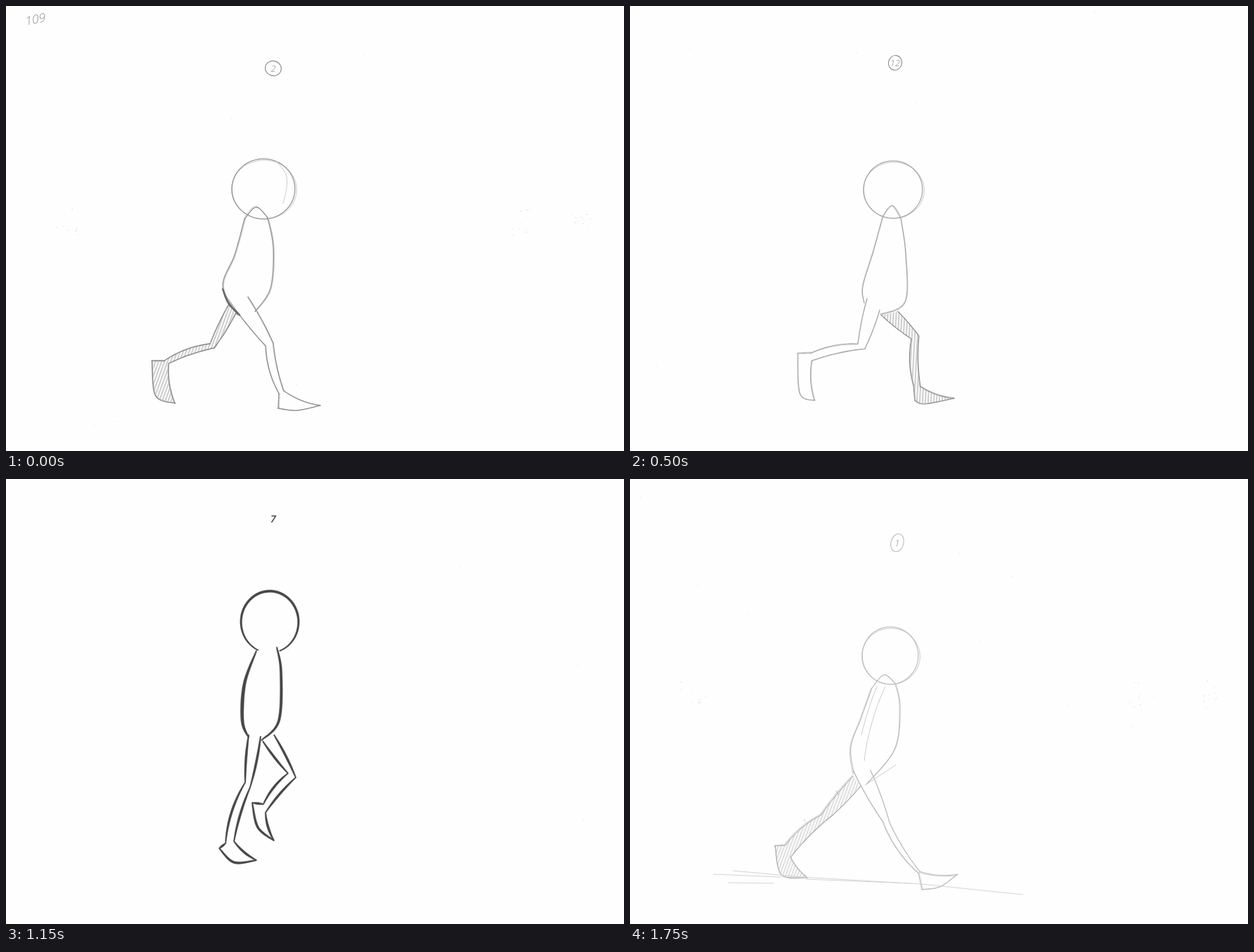
These frames come from a looping animation (881 px wide and 635 px high, 1800 ms). An HTML page:

```html
<!DOCTYPE html>
<html lang="en">
<head>
<meta charset="utf-8">
<title>Walk cycle, pencil and ink</title>
<style>
html, body { margin: 0; width: 100%; height: 100%; overflow: hidden; background: #fefefe; }
svg { display: block; width: 881px; height: 635px; }
text { font-family: "Open Sans", "DejaVu Sans", sans-serif; text-anchor: middle; }
</style>
</head>
<body>
<svg viewBox="0 0 881 635">
  <defs>
    <pattern id="hatch" width="4" height="40" patternUnits="userSpaceOnUse">
      <path id="hatchLine" d="M2 0V40" stroke-width="1.1"/>
    </pattern>
  </defs>
  <g id="sheet" fill="none" stroke-linecap="round" stroke-linejoin="round"></g>
</svg>
<script>
const STEP = 50, SHEETS = 36, CYCLE = 18;
const INK = '#474747', FIRST_INK = 17, LAST_INK = 34;
const sheet = document.getElementById('sheet');
const hatch = document.getElementById('hatch');
const hatchLine = document.getElementById('hatchLine');

// Key poses: label and head (centre, radii), torso (back, front), then one leg each:
// rear hip, knee, ankle, heel, sole, toe, front ankle, knee, hip.
const keys = {};
const points = s => s.split(' ').map(p => p.split(',').map(Number));
function pose(n, head, torso, near, far) {
  keys[n] = { head: points(head), torso: points(torso), near: points(near), far: points(far) };
}

pose(1, '381,91 371,252 40,41',
  '345,298 330,340 315,382 319,420 379,293 385,325 378,385 338,435',
  '318,416 361,490 411,562 416,586 442,582 467,564 413,560 370,490 343,416',
  '318,424 272,480 222,522 207,523 216,565 253,569 229,540 285,483 329,438');
pose(2, '381,89 367,261 45,43',
  '340,304 326,355 309,400 330,441 373,302 381,345 377,403 355,436',
  '311,410 370,485 389,553 388,574 415,577 448,570 396,549 381,481 345,415',
  '318,425 291,482 226,506 208,506 213,556 241,567 232,510 297,488 328,438');
pose(4, '375,75 371,233 40,42',
  '353,269 336,330 330,376 340,403 378,272 390,315 392,378 368,411',
  '341,404 375,457 369,517 360,544 385,552 416,547 376,519 389,459 359,391',
  '342,405 342,462 275,486 262,482 245,530 254,546 283,493 352,474 357,433');
pose(7, '381,57 376,204 41,44',
  '357,245 340,292 337,345 346,369 386,240 392,275 389,345 364,373',
  '346,365 341,433 313,520 304,527 325,547 357,544 325,517 348,440 363,367',
  '366,374 402,420 367,464 351,462 359,497 382,516 370,476 413,426 382,365');
pose(9, '377,57 374,212 41,44',
  '350,257 329,305 327,350 344,375 387,254 391,295 383,360 350,377',
  '341,363 319,428 286,497 270,494 286,547 319,545 292,498 330,432 360,366',
  '360,375 386,440 424,515 428,544 455,520 467,478 427,508 402,436 372,365');
pose(12, '378,81 375,262 42,41',
  '361,299 347,350 332,400 334,424 386,303 393,355 392,422 357,440',
  '338,418 325,482 258,495 239,496 242,553 263,563 259,506 335,489 356,434',
  '358,441 401,475 404,541 406,563 420,568 462,560 414,543 412,471 382,436');
pose(16, '381,55 375,200 40,44',
  '363,237 337,290 332,343 350,372 376,226 389,260 389,335 379,362',
  '362,374 397,414 370,460 349,459 357,495 382,515 370,472 413,421 373,354',
  '343,368 336,430 315,505 297,518 322,543 362,542 323,517 349,432 360,373');

// The other half of the stride swaps the legs.
for (const n of Object.keys(keys).map(Number)) {
  const half = (n + 8) % CYCLE + 1, k = keys[n];
  keys[half] ??= { ...k, near: k.far, far: k.near };
}
const order = Object.keys(keys).map(Number).sort((a, b) => a - b);

function poseAt(n) {
  const a = order.findLast(k => k <= n), b = order.find(k => k >= n);
  const u = a === b ? 0 : (n - a) / (b - a), out = {};
  for (const part in keys[a]) {
    out[part] = keys[a][part].map((p, i) => p.map((v, j) => v + (keys[b][part][i][j] - v) * u));
  }
  return out;
}

function randomFrom(seed) {
  return () => (seed = (seed * 16807) % 2147483647) / 2147483647;
}

// Curves are sampled to point lists.
function bow([ax, ay], [bx, by], k) {
  const mx = (ax + bx) / 2 - (by - ay) * k * 2, my = (ay + by) / 2 + (bx - ax) * k * 2;
  return Array.from({ length: 13 }, (_, i) => {
    const t = i / 12, s = 1 - t;
    return [s * s * ax + 2 * s * t * mx + t * t * bx, s * s * ay + 2 * s * t * my + t * t * by];
  });
}

function spline(p) {
  const out = [p[0]];
  for (let i = 0; i < p.length - 1; i++) {
    const a = p[i - 1] || p[i], b = p[i], c = p[i + 1], d = p[i + 2] || c;
    for (let s = 1; s <= 10; s++) {
      const t = s / 10;
      out.push([0, 1].map(j => b[j] + t / 2 * (c[j] - a[j]
        + t * (2 * a[j] - 5 * b[j] + 4 * c[j] - d[j] + t * (3 * (b[j] - c[j]) + d[j] - a[j])))));
    }
  }
  return out;
}

function arc([cx, cy], [rx, ry], from, to) {
  return Array.from({ length: 49 }, (_, i) => {
    const a = from + (to - from) * i / 48;
    return [cx + rx * Math.cos(a), cy + ry * Math.sin(a)];
  });
}

const path = p => 'M' + p.map(q => q[0].toFixed(1) + ' ' + q[1].toFixed(1)).join('L');

function brush(p, weight) {
  const left = [], right = [];
  p.forEach(([x, y], i) => {
    const a = p[Math.max(i - 1, 0)], b = p[Math.min(i + 1, p.length - 1)];
    const dx = b[0] - a[0], dy = b[1] - a[1], len = Math.hypot(dx, dy) || 1;
    const w = (1.5 + (weight - 1.5) * Math.sin(Math.PI * i / (p.length - 1))) / 2;
    left.push([x - dy / len * w, y + dx / len * w]);
    right.unshift([x + dy / len * w, y - dx / len * w]);
  });
  return `<path d="${path(left.concat(right))}Z" fill="${INK}" stroke="${INK}" stroke-width=".4"/>`;
}

const line = (p, color, width = 1) =>
  `<path d="${path(p)}" stroke="${color}" stroke-width="${width}"/>`;

function legStrokes([hipB, kneeB, ankleB, heel, sole, toe, ankleF, kneeF, hipF]) {
  return [
    bow(hipB, kneeB, .02), bow(kneeB, ankleB, .06), bow(ankleB, heel, 0),
    spline([heel, sole, toe]), bow(toe, ankleF, -.06),
    bow(ankleF, kneeF, -.03), bow(kneeF, hipF, .02)
  ];
}

function specks(n, ink, random) {
  let out = '';
  const dot = (x, y, color) => {
    out += `<circle cx="${x.toFixed(1)}" cy="${y.toFixed(1)}" r="${(.4 + random() * .4).toFixed(2)}" fill="${color}"/>`;
  };
  for (let i = 0; i < 14; i++) dot(random() * 830, 8 + random() * 620, '#e4e4e4');
  if (!ink && n < 3) {
    for (const x of [90, 730, 818]) {
      for (let i = 0; i < 10; i++) dot(x + (random() - .5) * 36, 308 + (random() - .5) * 40, '#d2d2d2');
    }
  }
  return out;
}

function drawInk(n, { head, torso, near, far }) {
  const [label, centre, radii] = head;
  const strokes = [...legStrokes(far), ...legStrokes(near)].map(s => brush(s, 3.2));
  return strokes.join('')
    + brush(arc(centre, radii, 1.22, 1.98 - 2 * Math.PI), 3.4)
    + brush(spline(torso.slice(0, 4)), 4.6)
    + brush(spline(torso.slice(4)), 3.6)
    + `<text x="${label[0]}" y="${label[1] + 5}" font-size="15" font-weight="600" font-style="italic" fill="${INK}">${n}</text>`;
}

function drawPencil(n, { head, torso, near, far }, random) {
  const [label, centre, radii] = head;
  const color = n === 1 ? '#bdbdbd' : n === 2 ? '#8c8c8c' : '#a2a2a2';
  const dark = n === 1 ? '#adadad' : '#858585';
  const soft = '#cccccc';
  const back = spline(torso.slice(0, 4)), front = spline(torso.slice(4));
  const shaky = p => {
    const dx = (random() - .5) * 3, dy = (random() - .5) * 3;
    return p.map(([x, y]) => [x + dx, y + dy]);
  };
  const sketch = (p, c = color) => line(shaky(p), soft) + line(p, c, n === 2 ? 1.3 : 1.1);

  hatch.setAttribute('patternTransform', `rotate(${n > 5 && n < 13 ? 3 : 20})`);
  hatchLine.setAttribute('stroke', n === 1 ? '#c4c4c4' : '#a4a4a4');

  const farStrokes = legStrokes(far);
  let out = `<path d="${path(farStrokes.flat())}Z" fill="url(#hatch)"/>`;
  out += farStrokes.map(s => sketch(s, dark)).join('');
  out += legStrokes(near).map(s => sketch(s)).join('');

  const wide = radii.map((r, i) => r + (i ? -1 : 1.5));
  out += line(arc([centre[0] + 1, centre[1] + 1], wide, 0, 2 * Math.PI), soft);
  out += line(arc(centre, radii, 0, 2 * Math.PI), color, 1.2);
  out += sketch(back) + sketch(front);

  const [b, f] = [torso[0], torso[4]];
  if (b[1] - f[1] < 8) {
    out += sketch(spline([b, [(b[0] + f[0]) / 2, (b[1] + f[1]) / 2 - 16], f]));
  }
  if (n === 1) {
    const ground = [[[119, 564], [216, 568]], [[140, 576], [205, 577]], [[147, 559], [245, 568]],
      [[228, 567], [415, 578]], [[250, 571], [400, 577]], [[415, 578], [560, 593]]];
    out += ground.map(g => line(g, '#d4d4d4')).join('');
    out += line(bow([364, 296], [334, 402], .04), soft) + line(bow([352, 296], [330, 365], .02), soft);
    out += line([[335, 437], [379, 408]], soft);
    out += line([[294, 445], [297, 451]], color) + line([[248, 486], [250, 488]], color);
  }
  if (n === 2) {
    out += line(spline([[386, 222], [399, 240], [400, 260], [395, 282]]), soft);
    out += line(spline([[309, 404], [317, 424], [333, 441]]), '#666', 2.4);
    out += '<text transform="translate(42 25) rotate(-12) skewX(-14)" font-size="17" font-weight="300" fill="#888">109</text>';
  }
  const ring = n === 1 ? [9, 13] : n === 2 ? [11.5, 10.5] : [9.5, 10.5];
  return out
    + `<ellipse cx="${label[0]}" cy="${label[1]}" rx="${ring[0]}" ry="${ring[1]}" transform="rotate(15 ${label[0]} ${label[1]})" stroke="${n === 1 ? color : '#8c8c8c'}" stroke-width="1.1"/>`
    + `<text x="${label[0]}" y="${label[1] + 4.5}" font-size="12.5" font-weight="300" font-style="italic" fill="#888">${n}</text>`;
}

function draw(index) {
  const ink = index >= FIRST_INK && index <= LAST_INK;
  const n = ink ? index - FIRST_INK + 1 : (index + 1) % SHEETS + 1;
  const random = randomFrom(7919 * (index + 3));
  const figure = poseAt(n);
  sheet.innerHTML = specks(n, ink, random) + (ink ? drawInk(n, figure) : drawPencil(n, figure, random));
}

let start, shown = 0;
function tick(now) {
  start ??= now;
  const index = Math.floor((now - start) / STEP + 1e-6) % SHEETS;
  if (index !== shown) draw(shown = index);
  requestAnimationFrame(tick);
}
draw(0);
requestAnimationFrame(tick);
</script>
</body>
</html>
```
